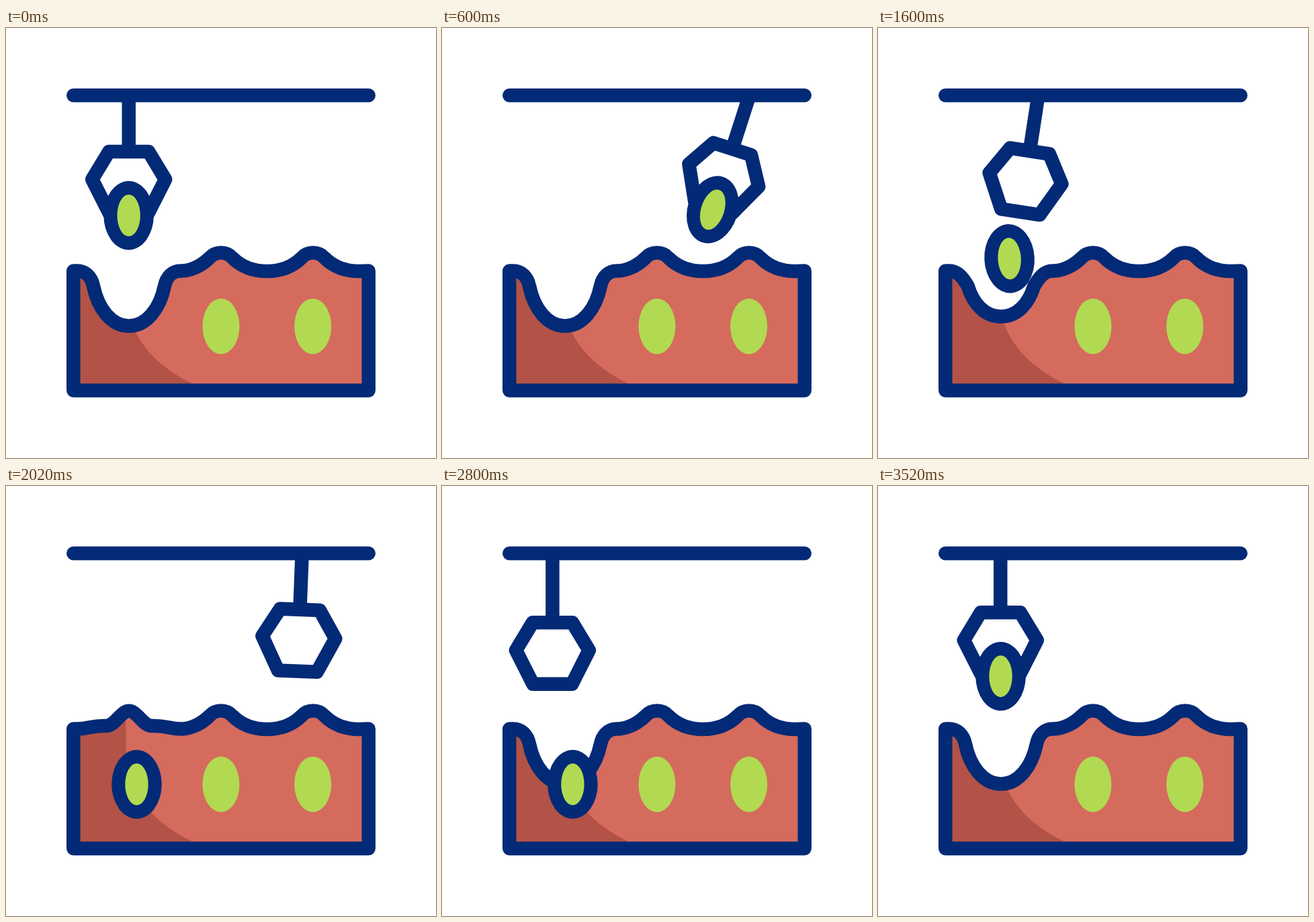
Animation, 640 px wide and 640 px high, one loop 3540 ms. Source, as an HTML page with a canvas:

```html
<!DOCTYPE html>
<html lang="en">
<head>
<meta charset="utf-8">
<title>Seed claw</title>
<style>
html, body { margin: 0; width: 100%; height: 100%; overflow: hidden; background: #fff; }
canvas { display: block; width: 640px; height: 640px; }
</style>
</head>
<body>
<canvas id="stage" width="640" height="640"></canvas>
<script>
const ctx = document.getElementById('stage').getContext('2d');
const NAVY = '#032a76', RED = '#d56b5d', DARK = '#b35246', GREEN = '#b1da52';
const HOME = 182.3, FAR = 510, DEPTH = 165, BAR_Y = 100, HOLD = 179;
const LEFT = 100.3, RIGHT = 539.7, FLOOR = 539.5, GROUND = 361.5, LINE = 20.5;

// Moments of the cycle in milliseconds.
const FAR_1 = 715, BACK = 1440, DROP = 1455, LEAVE = 1484, LANDED = 1828;
const FAR_2 = 2165, OVER = 2734, GRAB = 3177, UP = 3530, LOOP = 3540;
const PLANTED = { x: 194.5, y: 444, angle: 0 };

const mix = (a, b, k) => a + (b - a) * k;
const span = (t, a, b) => Math.min(1, Math.max(0, (t - a) / (b - a)));

// Closes a half outline with its mirror image around x = 0.
const mirrored = (half, middle = []) =>
  [...half, ...middle, ...half.map(([x, y]) => [-x, y]).reverse()];

function track(keys, t) {
  let i = 1;
  while (i < keys.length - 1 && t > keys[i][0]) i++;
  const [t0, v0] = keys[i - 1], [t1, v1] = keys[i];
  return mix(v0, v1, span(t, t0, t1));
}

// Returns a function giving the point at a fraction of the curve's length.
function evenCurve(a, b, c, d, steps = 80) {
  const at = s => a.map((v, i) =>
    v * (1 - s) ** 3 + 3 * b[i] * s * (1 - s) ** 2 + 3 * c[i] * s * s * (1 - s) + d[i] * s ** 3);
  const points = [a], lengths = [0];
  for (let i = 1; i <= steps; i++) {
    const p = at(i / steps), q = points[i - 1];
    points.push(p);
    lengths.push(lengths[i - 1] + Math.hypot(p[0] - q[0], p[1] - q[1]));
  }
  return k => {
    const goal = k * lengths[steps];
    const i = Math.max(1, lengths.findIndex(length => length >= goal));
    const f = span(goal, lengths[i - 1], lengths[i]);
    return points[i].map((v, j) => mix(points[i - 1][j], v, f));
  };
}

// One smooth bend joins the return trip to the descent.
const BEND = [(FAR - HOME) / 6, -DEPTH / 6];
const comeBack = evenCurve([FAR, 0], [FAR, 0], [HOME + BEND[0], BEND[1]], [HOME, 0]);
const goDown = evenCurve([HOME, 0], [HOME - BEND[0], -BEND[1]], [HOME, DEPTH], [HOME, DEPTH]);

const swing = [[0, 0], [650, 19.3], [1100, -7.3], [DROP, -4.5], [1615, 10], [2440, -5.8], [OVER, 0]];

function clawPose(t) {
  const angle = track(swing, t) * Math.PI / 180;
  const reach = span(t, 0, FAR_1) - span(t, FAR_1, BACK) + span(t, LEAVE, FAR_2);
  let x = mix(HOME, FAR, reach), lift = 0;
  if (t > GRAB) [x, lift] = [HOME, DEPTH * (1 - span(t, GRAB, UP))];
  else if (t > OVER) [x, lift] = goDown(span(t, OVER, GRAB));
  else if (t > FAR_2) [x, lift] = comeBack(span(t, FAR_2, OVER));
  return { x, lift, angle };
}

function heldSeed(t) {
  const { x, lift, angle } = clawPose(t);
  return { x: x - HOLD * Math.sin(angle), y: BAR_Y + lift + HOLD * Math.cos(angle), angle };
}

function seedPose(t) {
  if (t <= DROP) return heldSeed(t);
  const rising = t > GRAB;
  const from = rising ? PLANTED : heldSeed(DROP);
  const to = rising ? heldSeed(UP) : PLANTED;
  const k = rising ? span(t, GRAB, UP) : span(t, DROP, LANDED);
  return { x: mix(from.x, to.x, k), y: mix(from.y, to.y, k), angle: mix(from.angle, to.angle, k) };
}

// cover: 0 is an open pit, 1 a nearly level surface, 1.5 a full mound.
function pitOutline(cover) {
  const k = Math.min(1, cover);
  const rimX = mix(-53, -34, k), rimY = 384 - 8 * cover ** 3, bottom = 443.5 - 72.5 * cover;
  const half = [
    [-77, GROUND],
    [mix(-65, -59, k), GROUND],
    [rimX - mix(3, 22, k), rimY - mix(14, 1, k)],
    [rimX, rimY],
    [rimX + mix(7, 13, k), rimY + mix(34, 0, k)],
    [mix(-26, -12, k), bottom]
  ];
  return mirrored(half, [[0, bottom]]).map(([x, y]) => [x + 183, y]);
}

function soilPath(cover) {
  const path = new Path2D();
  const pit = pitOutline(cover);
  path.moveTo(LEFT, GROUND);
  path.lineTo(...pit[0]);
  for (let i = 1; i < pit.length; i += 3) path.bezierCurveTo(...pit.slice(i, i + 3).flat());
  for (const x of [320, 457]) {
    path.bezierCurveTo(x - 50, 362, x - 32, 357, x - 17, 342);
    path.bezierCurveTo(x - 8, 332, x + 8, 332, x + 17, 342);
    path.bezierCurveTo(x + 32, 357, x + 50, 362, x + 68.5, 362);
  }
  path.lineTo(RIGHT, GROUND);
  path.lineTo(RIGHT, FLOOR);
  path.lineTo(LEFT, FLOOR);
  path.closePath();
  return path;
}

function ellipse(x, y, rx, ry, color, angle = 0) {
  ctx.fillStyle = color;
  ctx.beginPath();
  ctx.ellipse(x, y, rx, ry, angle, 0, Math.PI * 2);
  ctx.fill();
}

function drawSoil(t) {
  const soil = soilPath(1.5 * (span(t, 1545, 1980) - span(t, 2320, 2745)));
  ctx.fillStyle = RED;
  ctx.fill(soil);
  ctx.save();
  ctx.clip(soil);
  ctx.fillStyle = DARK;
  ctx.beginPath();
  ctx.moveTo(LEFT, 320);
  ctx.lineTo(178.5, 320);
  ctx.lineTo(178.5, 380);
  ctx.bezierCurveTo(176.5, 445, 207, 495, 277, 529);
  ctx.lineTo(277, FLOOR);
  ctx.lineTo(LEFT, FLOOR);
  ctx.fill();
  ctx.restore();
  ctx.stroke(soil);
  for (const x of [320, 456.7]) ellipse(x, 444, 27.5, 41.3, GREEN);
}

function drawBar() {
  ctx.beginPath();
  ctx.moveTo(LEFT, BAR_Y + 0.3);
  ctx.lineTo(RIGHT, BAR_Y + 0.3);
  ctx.stroke();
}

function drawClaw(t) {
  const { x, lift, angle } = clawPose(t);
  ctx.save();
  ctx.translate(x, BAR_Y + lift);
  ctx.rotate(angle);
  const rodTop = 0.5 - Math.max(0, lift);
  ctx.fillStyle = NAVY;
  ctx.fillRect(-LINE / 2, rodTop, LINE, 84 - rodTop);
  ctx.beginPath();
  for (const corner of mirrored([[29.5, 84], [54.5, 125.3], [29, 175.7]])) ctx.lineTo(...corner);
  ctx.closePath();
  ctx.stroke();
  ctx.restore();
}

function drawSeed(t) {
  const { x, y, angle } = seedPose(t);
  ellipse(x, y, 37.3, 51.2, NAVY, angle);
  ellipse(x, y, 17.2, 31, GREEN, angle);
}

function draw(t) {
  ctx.fillStyle = '#fff';
  ctx.fillRect(0, 0, 640, 640);
  ctx.strokeStyle = NAVY;
  ctx.lineWidth = LINE;
  ctx.lineCap = ctx.lineJoin = 'round';
  drawSoil(t);
  drawBar();
  drawClaw(t);
  drawSeed(t);
}

const start = performance.now();
function loop() {
  draw((performance.now() - start) % LOOP);
  requestAnimationFrame(loop);
}
loop();
</script>
</body>
</html>
```
